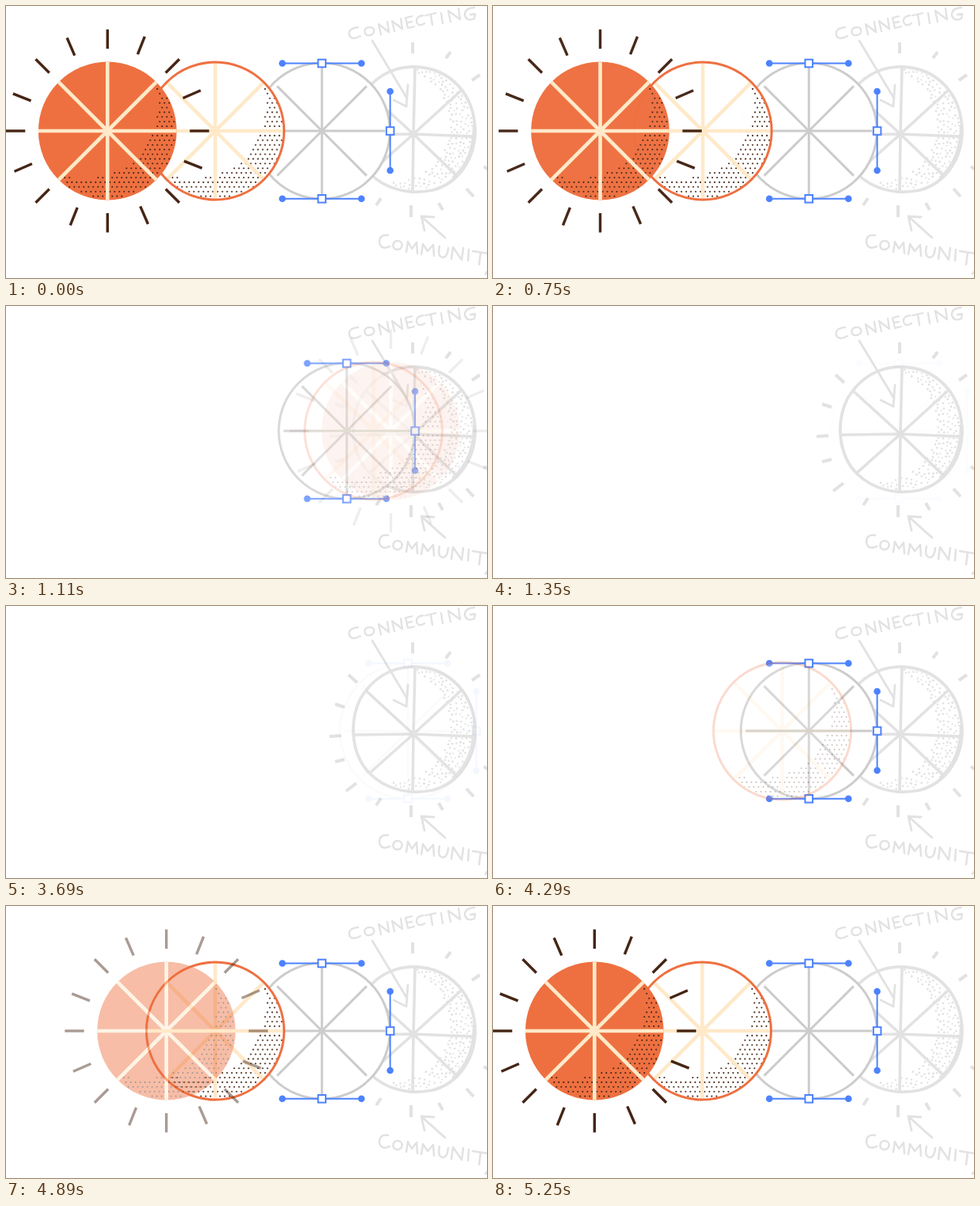
An HTML page that plays this animation: 608x344 px, repeating every 7200 ms.

```html
<!DOCTYPE html>
<html lang="en">
<head>
<meta charset="utf-8">
<title>From sketch to icon</title>
<style>
  html, body { margin: 0; width: 100%; height: 100%; overflow: hidden; background: #fff; }
  svg { display: block; width: 100vw; height: 100vh; }
  .sketch { fill: none; stroke: #e2e2e2; }
  .sketch path { stroke-linecap: round; stroke-linejoin: round; }
  .sketch .ticks { stroke-linecap: butt; }
  .stipple { fill: #e2e2e2; stroke: none; }
</style>
</head>
<body>
<svg id="stage" viewBox="0 0 608 344" role="img" aria-label="A sketched wheel, labelled connecting and community, becomes a vector drawing and a coloured sun"></svg>
<script>
const NS = 'http://www.w3.org/2000/svg';
const stage = document.getElementById('stage');
const ORANGE = '#ee7040', CREAM = '#ffe9c8', BROWN = '#452515', GREY = '#cccccc', BLUE = '#4d82ff';
const LOOP = 7200, STEP = 30, MID_Y = 158;

function add(parent, tag, attrs) {
  const el = document.createElementNS(NS, tag);
  for (const key in attrs) el.setAttribute(key, attrs[key]);
  parent.appendChild(el);
  return el;
}
const group = attrs => add(stage, 'g', attrs);

// Eight radial lines, turned by an angle in degrees.
function spokes(parent, from, to, stroke, width, turn = 0) {
  for (let i = 0; i < 8; i++) {
    const a = (i * 45 + turn) * Math.PI / 180, c = Math.cos(a), s = Math.sin(a);
    add(parent, 'line', { x1: c * from, y1: s * from, x2: c * to, y2: s * to, stroke, 'stroke-width': width });
  }
}

// Halftone crescent: inside the wheel, outside a circle shifted up and left.
function halftone(parent) {
  let d = '';
  for (let row = -15; row <= 15; row++) {
    for (let col = -15; col <= 15; col++) {
      const x = (col + (row & 1) / 2) * 6, y = row * 5.9;
      if (Math.hypot(x, y) < 86 && Math.hypot(x + 27.5, y + 31.2) > 91.5)
        d += `M${x - 1.05} ${y}a1.05 1.05 0 1 0 2.1 0a1.05 1.05 0 1 0 -2.1 0`;
    }
  }
  add(parent, 'path', { d, fill: BROWN });
}

function drawSketch() {
  const g = group({ class: 'sketch' });
  const stroke = (d, width) => add(g, 'path', { d, 'stroke-width': width });

  stroke('M516 77C487 76 463 92 448 117C432 150 438 190 460 212C480 232 510 239 539 233C570 225 592 196 593 160C593 112 562 78 516 77Z', 3.8);
  stroke('M592 152Q592 194 566 217', 4.5);
  const rim = [[517, 78], [574, 108], [591, 165], [570, 215], [514, 234], [460, 211], [440, 163], [457, 109]];
  for (const [x, y] of rim) stroke(`M515 162L${x} ${y}`, 3.6);

  add(g, 'path', {
    class: 'ticks', 'stroke-width': 4,
    d: 'M514 46V60M556 66L562 58M589 94L599 87M604 203L610 207M582 231L591 241M547 249L552 258' +
      'M512 252V267M468 252L474 243M430 234L443 224M416 197L428 194M409 165L424 164M416 124L428 128M433 87L444 97'
  });

  stroke('M463 44L507 117M490 119L506 127L508 100', 2.8);
  stroke('M555 293L526 267M541 267L525 266L529 284', 2.8);

  // CONNECTING
  stroke('M445 27Q432 28 434 37Q437 44 448 38' +
    'M459 27C451 27 452 38 459 37C468 36 467 26 459 27' +
    'M474 36L471 23L484 33L482 20' +
    'M491 32L488 19L501 29L499 16' +
    'M513 13L505 15L508 28L516 26M507 21L513 20' +
    'M527 12Q518 13 519 20Q521 27 529 22' +
    'M530 12L543 9M537 11L539 24' +
    'M550 9L552 22' +
    'M562 20L559 6L574 17L572 3' +
    'M592 2Q579 3 580 12Q583 20 592 16L593 10L587 11', 2.3);
  // COMMUNITY, running off the edge
  stroke('M483 290Q472 288 472 299Q474 309 485 304' +
    'M495 297C487 297 488 309 495 308C503 307 502 297 495 297' +
    'M506 311L508 298L513 307L519 299L520 313' +
    'M525 314L527 301L533 310L540 302L541 316' +
    'M548 304Q545 317 552 318Q558 318 559 306' +
    'M563 320L565 305L576 321L578 306' +
    'M585 308L584 322M590 310L610 313M600 312L598 327M608 336L606 339', 2.5);

  let seed = 7;
  const rnd = () => (seed = seed * 16807 % 2147483647) / 2147483647;
  const dots = [];
  for (let i = 0; i < 2600 && dots.length < 190; i++) {
    const x = 490 + rnd() * 104, y = 80 + rnd() * 156;
    const inside = Math.hypot((x - 515.5) / 74, (y - 156) / 76) < 1;
    const lit = Math.hypot(x - 490, y - 150) < 72;
    if (inside && !lit && dots.every(p => Math.hypot(p[0] - x, p[1] - y) > 4)) dots.push([x, y]);
  }
  for (const [cx, cy] of dots) add(g, 'circle', { cx, cy, r: 1 + rnd() * 0.5, class: 'stipple' });
}

function drawWire() {
  const g = group({});
  add(g, 'circle', { r: 86, fill: '#fff', stroke: GREY, 'stroke-width': 3 });
  spokes(g, 0, 80, GREY, 3);
  const handle = (x, y, dx, dy) => {
    add(g, 'line', { x1: x - dx, y1: y - dy, x2: x + dx, y2: y + dy, stroke: BLUE, 'stroke-width': 2 });
    for (const s of [-1, 1]) add(g, 'circle', { cx: x + s * dx, cy: y + s * dy, r: 4.3, fill: BLUE });
    add(g, 'rect', { x: x - 4.8, y: y - 4.8, width: 9.6, height: 9.6, fill: '#fff', stroke: BLUE, 'stroke-width': 2 });
  };
  handle(0, -85.5, 50, 0);
  handle(0, 85.8, 50, 0);
  handle(86.3, 0, 0, 50);
  return g;
}

function drawOutline() {
  const g = group({});
  add(g, 'circle', { r: 87, fill: '#fff' });
  halftone(g);
  spokes(g, 0, 86, CREAM, 4.5);
  add(g, 'circle', { r: 87, fill: 'none', stroke: ORANGE, 'stroke-width': 3 });
  return g;
}

function drawSun() {
  const g = group({});
  add(g, 'circle', { r: 87.4, fill: ORANGE });
  halftone(g);
  spokes(g, 0, 87.4, CREAM, 4.6);
  spokes(g, 104, 128.4, BROWN, 3.4);
  spokes(g, 104, 128.4, BROWN, 3.4, 21.5);
  return g;
}

drawSketch();
// Each layer: resting x, x it enters from, [start, duration] for leaving and entering.
const SKETCH_X = 515;
const layers = [
  { el: drawWire(), home: 399.3, from: SKETCH_X, leave: [759, 793], enter: [3363, 1000] },
  { el: drawOutline(), home: 264.5, from: 399.3, leave: [591, 890], enter: [3824, 1071] },
  { el: drawSun(), home: 128.3, from: 264.5, leave: [517, 900], enter: [4354, 1093] }
];

function ease(t) {
  t = Math.min(1, Math.max(0, t));
  return t < 0.5 ? 16 * t ** 5 : 1 - 16 * (1 - t) ** 5;
}
const progress = (t, [start, length]) => ease((t - start) / length);

function render(now) {
  const t = Math.floor((now % LOOP) / STEP) * STEP;
  for (const { el, home, from, leave, enter } of layers) {
    let x = home, shown = 1;
    if (t >= 660 && t < 3690) {
      const p = progress(Math.min(t, 1350), leave);
      x = home + (SKETCH_X - home) * p;
      shown = 1 - p;
    } else if (t >= 3690 && t < 5250) {
      shown = progress(t, enter);
      x = from + (home - from) * shown;
    }
    el.setAttribute('transform', `translate(${x.toFixed(2)} ${MID_Y})`);
    el.setAttribute('opacity', shown < 0.002 ? 0 : shown.toFixed(4));
  }
}

const begin = performance.now();
function tick() {
  render(performance.now() - begin);
  requestAnimationFrame(tick);
}
tick();
</script>
</body>
</html>
```
